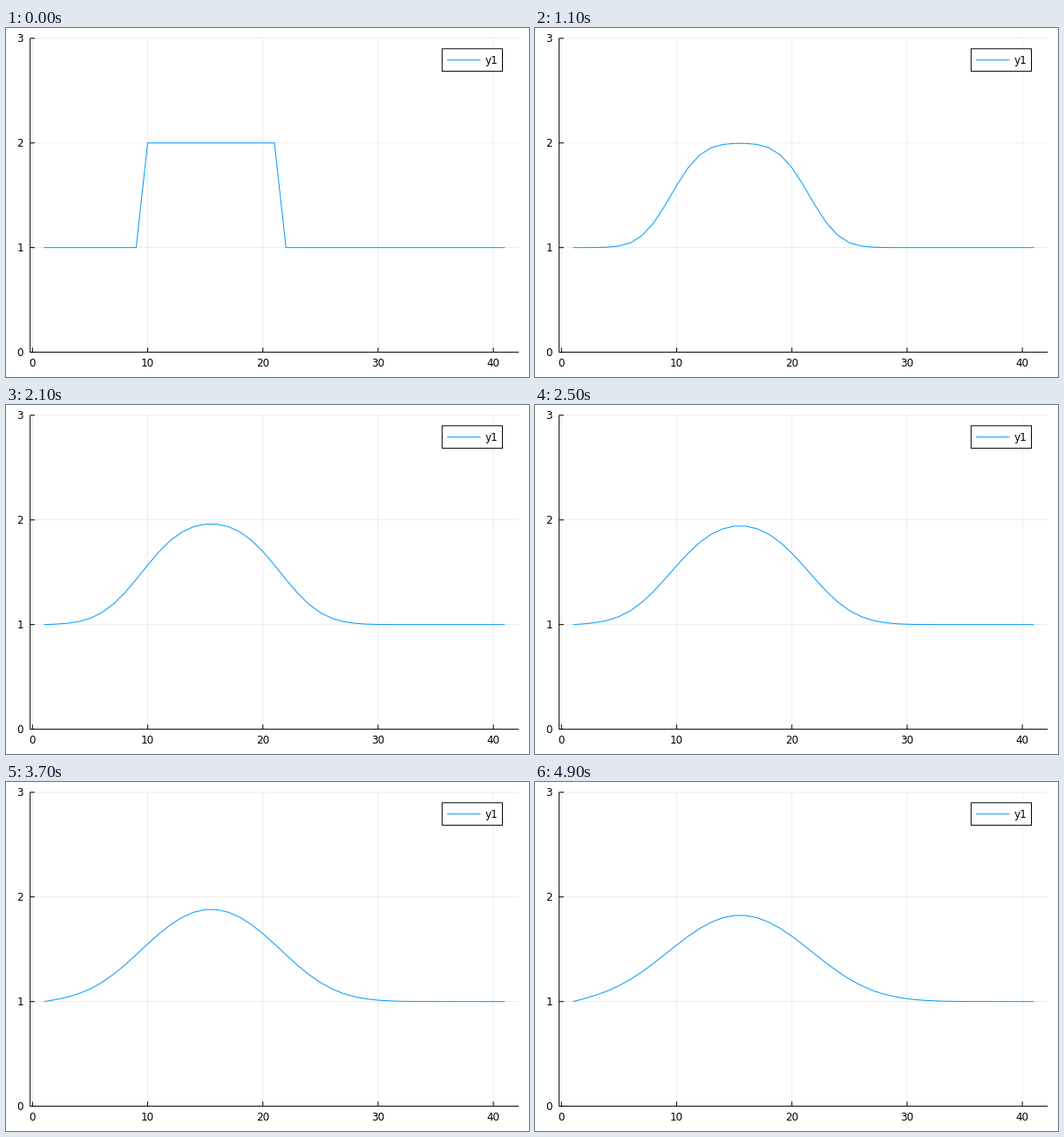
These frames come from a looping animation (600x400 px, 5000 ms). A matplotlib script:

```python
import numpy as np
import matplotlib.pyplot as plt
from matplotlib.animation import FuncAnimation
from matplotlib.patches import Rectangle

PX = 0.72  # one pixel in points at 100 dpi
LEFT, RIGHT, TOP, BOTTOM = 27.7, 588.2, 11.8, 371.6
X_MIN, X_MAX, Y_MAX = -0.2, 42.2, 3
BLUE = "#009afa"
FRAMES, INTERVAL = 50, 100
DIFFUSION = 0.2

plt.rcParams["font.family"] = "DejaVu Sans"
plt.rcParams["font.size"] = 12 * PX
plt.rcParams["path.snap"] = False


def to_x(value):
    return LEFT + (value - X_MIN) * (RIGHT - LEFT) / (X_MAX - X_MIN)


def to_y(value):
    return BOTTOM - value * (BOTTOM - TOP) / Y_MAX


def diffuse(steps):
    """Step profile after explicit heat-equation steps with fixed ends."""
    u = np.ones(41)
    u[9:21] = 2
    for _ in range(steps):
        u[1:-1] += DIFFUSION * (u[2:] - 2 * u[1:-1] + u[:-2])
    return u


fig = plt.figure(figsize=(6, 4), dpi=100, facecolor="white")
ax = fig.add_axes([0, 0, 1, 1])
ax.set_xlim(0, 600)
ax.set_ylim(400, 0)
ax.axis("off")


def stroke(xs, ys, color="black", width=1.0, **style):
    return ax.plot(xs, ys, color=color, lw=width * PX,
                   solid_capstyle="butt", **style)[0]


def label(x, y, text, align):
    ax.text(x, y, text, ha=align, va="baseline", color="black")


for value in range(0, 41, 10):
    x = to_x(value)
    stroke([x, x], [TOP, BOTTOM], width=0.7, alpha=0.1)
    stroke([x, x], [BOTTOM, BOTTOM - 5.3])
    label(x, 387.5, str(value), "center")

for value in range(Y_MAX + 1):
    y = to_y(value)
    stroke([LEFT, RIGHT], [y, y], width=0.7, alpha=0.1)
    stroke([LEFT, LEFT + 5.3], [y, y])
    label(20, y + 4.4, str(value), "right")

stroke([LEFT, LEFT], [TOP, BOTTOM])
stroke([LEFT, RIGHT], [BOTTOM, BOTTOM])

curve = stroke(to_x(np.arange(1, 42)), to_y(diffuse(0)), BLUE,
               solid_joinstyle="round", zorder=3)

ax.add_patch(Rectangle((500.3, 23.8), 69.2, 25.8, fc="white", ec="black",
                       lw=PX, zorder=4))
stroke([506, 544.5], [36.7, 36.7], BLUE, zorder=5)
ax.text(549.8, 41, "y1", va="baseline", zorder=5)


def update(frame):
    curve.set_ydata(to_y(diffuse(frame)))
    return [curve]


anim = FuncAnimation(fig, update, frames=FRAMES, interval=INTERVAL,
                     repeat=True, repeat_delay=0)
plt.show()
```
